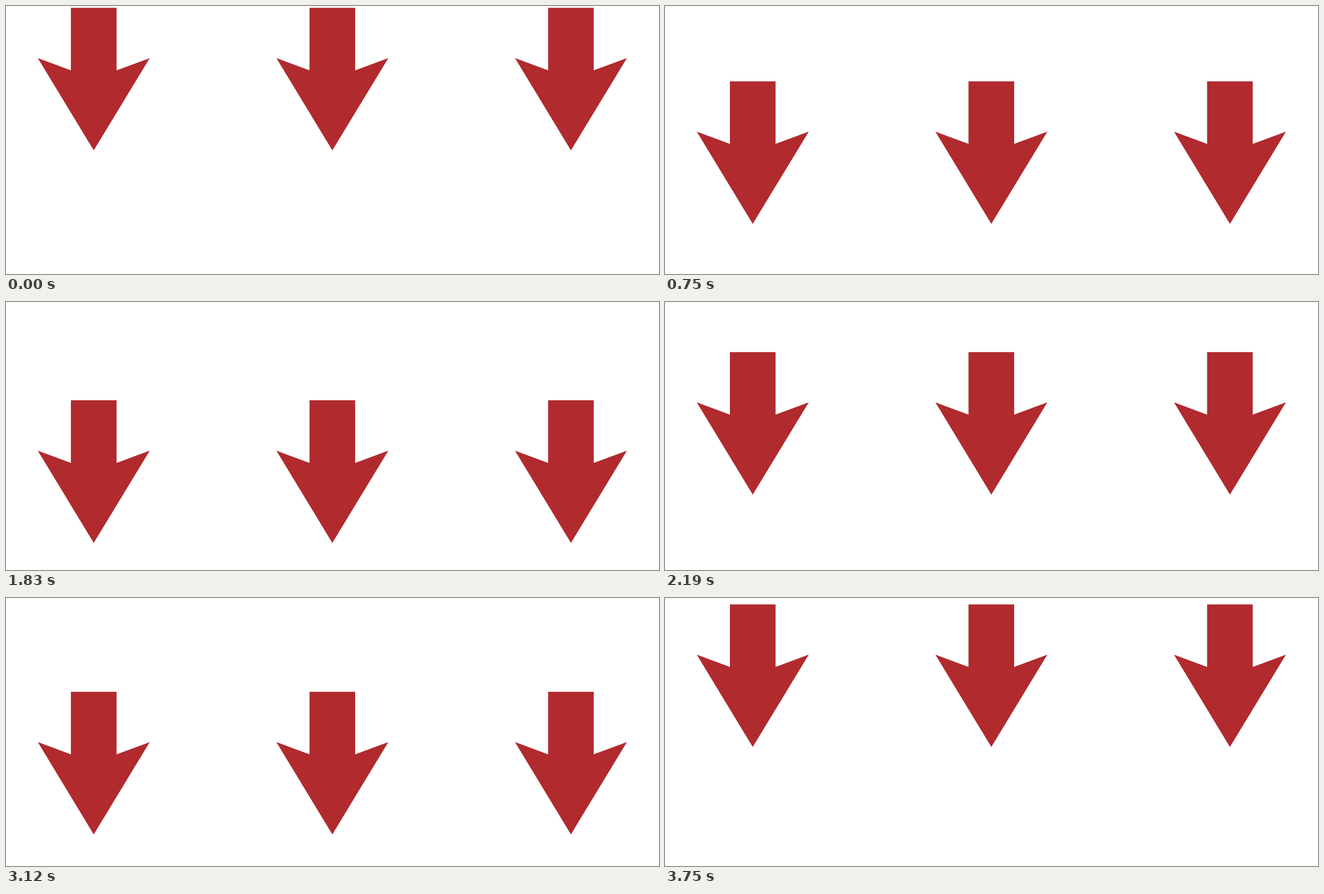
An HTML page for the animation above (3780 ms loop, 1167 by 480 pixels).

```html
<!DOCTYPE html>
<html lang="en">
<head>
<meta charset="utf-8">
<title>Bouncing arrows</title>
<style>
  html, body { margin: 0; width: 100%; height: 100%; overflow: hidden; background: #fff; }
  svg { display: block; width: 1167px; height: 480px; }
</style>
</head>
<body>
<svg viewBox="0 0 1167 480">
  <defs>
    <path id="arrow" d="M116 3.2H197.6V115.3L256.9 93.3L156.8 258.6L56.8 93.3L116 115.3Z"/>
  </defs>
  <g id="arrows" fill="#b12a2e">
    <use href="#arrow"/>
    <use href="#arrow" x="426.4"/>
    <use href="#arrow" x="852.8"/>
  </g>
</svg>
<script>
  const STEP = 30, COUNT = 126, DROP = 172.9, EASE = 1.7;
  // Steps at which the arrows turn: top, bottom, top, ...
  const turns = [0, 20, 41, 61, 85, 105, COUNT];
  const arrows = document.getElementById('arrows');

  function offset(step) {
    let i = 0;
    while (step >= turns[i + 1]) i++;
    const p = (step - turns[i]) / (turns[i + 1] - turns[i]);
    // Falls ease slightly, rises are even.
    return i % 2 ? DROP * (1 - p) : DROP * p - EASE * Math.sin(2 * Math.PI * p);
  }

  function draw(ms) {
    const step = Math.floor(ms / STEP) % COUNT;
    arrows.setAttribute('transform', `translate(0 ${offset(step).toFixed(2)})`);
  }

  let start;
  function tick(now) {
    start ??= now;
    draw(now - start);
    requestAnimationFrame(tick);
  }
  draw(0);
  requestAnimationFrame(tick);
</script>
</body>
</html>
```
